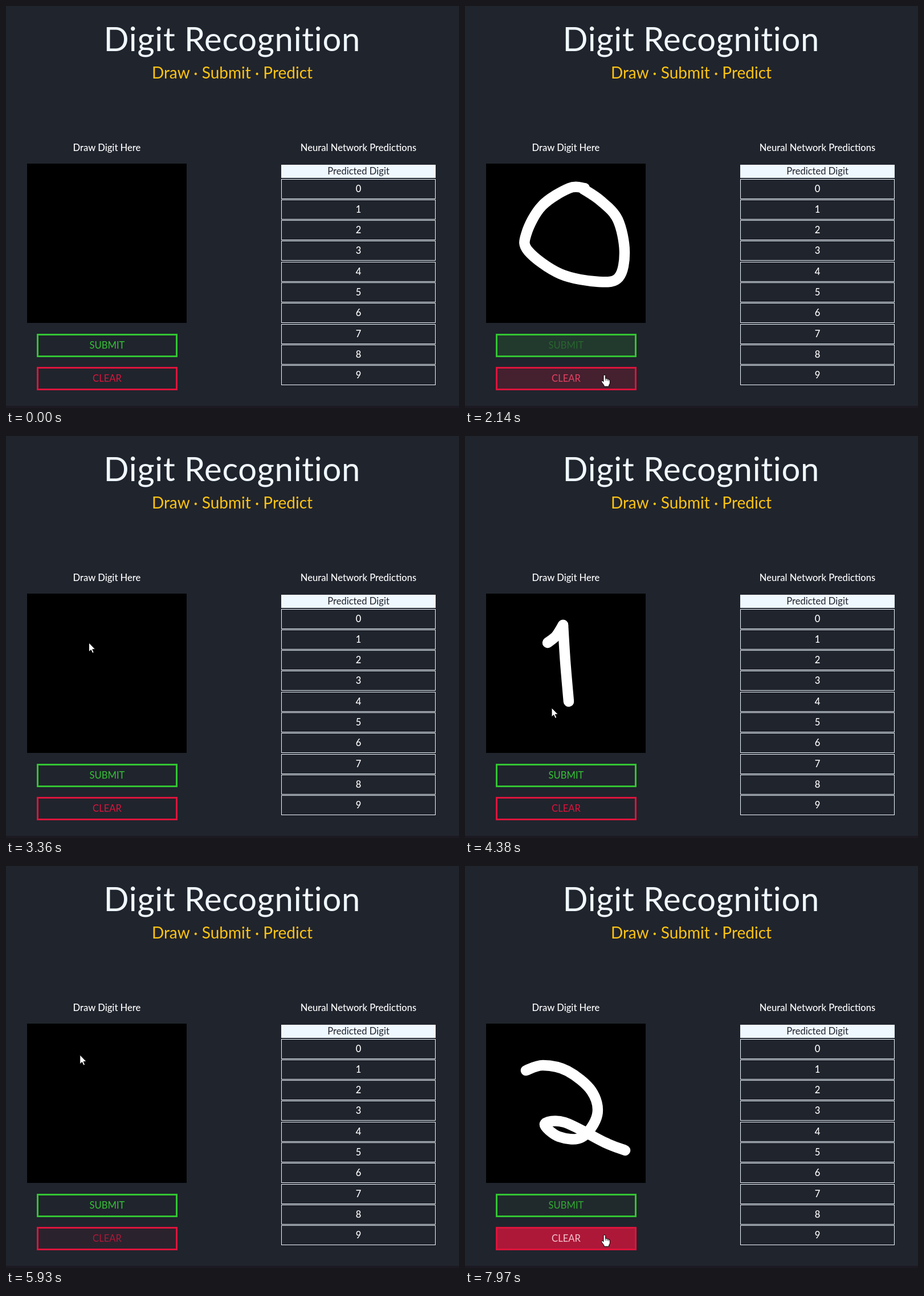
Write an HTML page that moves like this. It is 795 by 704 pixels and loops after 8 s.

```html
<!DOCTYPE html>
<html lang="en">
<head>
<meta charset="utf-8">
<title>Digit Recognition</title>
<style>
  html, body { margin: 0; width: 100%; height: 100%; overflow: hidden; background: #20242d; }
  svg { display: block; font: 16.6px Lato, sans-serif; text-anchor: middle; }
  .label { fill: #fff; font-weight: 500; }
  .ink { fill: none; stroke: #fff; stroke-width: 18.5; stroke-linecap: round; stroke-linejoin: round; }
  .pointer { fill: #fff; stroke: #000; stroke-width: 1; }
</style>
</head>
<body>
<svg width="795" height="704" viewBox="0 0 795 704">
  <rect width="795" height="704" fill="#20242d"/>
  <rect y="700" width="795" height="4" fill="#1d1a24"/>
  <text x="396.8" y="79" font-size="58" letter-spacing=".7" fill="#f0f8ff">Digit Recognition</text>
  <text x="397" y="127" font-size="28" fill="#fec412">Draw · Submit · Predict</text>
  <text class="label" x="177" y="254">Draw Digit Here</text>
  <text class="label" x="618.5" y="254">Neural Network Predictions</text>
  <rect x="37" y="276" width="280" height="279"/>
  <rect x="483" y="278" width="271" height="23" fill="#f0f8ff"/>
  <text x="618.5" y="295" fill="#20242d">Predicted Digit</text>
  <g id="rows"></g>
  <g id="ink"></g>
  <g id="buttons"></g>
  <g id="cursor">
    <circle id="halo" r="11" fill="#ff0" fill-opacity=".48"/>
    <path id="arrow" class="pointer" d="M0 0V16L3.7 12.6 6.3 18.3 8.8 17.2 6.3 11.6H11.3Z"/>
    <g id="hand">
      <path class="pointer" d="M-2 1.5Q-2 0 0 0 1.6 0 1.6 1.5V6.4Q3.4 5.6 4.4 7 6 6.4 7 8 9.4 7.6 9.4 10V14Q9.4 16 7.6 18V20.3H-1V18.4L-5.4 12.4Q-5.8 10 -4 10L-2 12Z"/>
      <path d="M1.6 6.4V10M4.4 7V10.4M7 8V11" fill="none" stroke="#000" stroke-width=".8"/>
    </g>
  </g>
</svg>
<script>
const LOOP = 8000, STEP = 50;
const FADE_IN = 180, FADE_OUT = 300, WIPE = 47, GROW = 190;
const BG = [32, 36, 45], WHITE = [255, 255, 255], PALE = [240, 248, 255], AMBER = [253, 199, 14];

const $ = id => document.getElementById(id);
const clamp = v => Math.min(1, Math.max(0, v));
const easeOut = p => 1 - (1 - p) ** 3;
const mix = (a, b, p) => `rgb(${a.map((v, i) => Math.round(v + (b[i] - v) * p))})`;
const show = (node, visible) => set(node, { visibility: visible ? 'inherit' : 'hidden' });

function set(node, attrs) {
  for (const name in attrs) node.setAttribute(name, attrs[name]);
}
function add(parent, tag, attrs = {}, text = '') {
  const node = document.createElementNS('http://www.w3.org/2000/svg', tag);
  set(node, attrs);
  node.textContent = text;
  return parent.appendChild(node);
}

// Smooth path through the points (Catmull-Rom).
function curve(points) {
  const at = i => points[Math.min(points.length - 1, Math.max(0, i))];
  const handle = (i, sign) => at(i).map((v, k) => v + sign * (at(i + 1)[k] - at(i - 1)[k]) / 6);
  return 'M' + points[0] + points.slice(1)
    .map((p, i) => `C${handle(i, 1)} ${handle(i + 1, -1)} ${p}`).join('');
}

// One round per digit: approach the pad, draw, submit, see the prediction, clear.
const rounds = [
  { approach: [100, 700, 664],
    strokes: [{ from: 790, to: 1450, points: [[210, 319], [183, 319], [135, 350], [108, 398], [111, 429],
      [167, 469], [235, 483], [270, 475], [280, 430], [268, 374], [238, 341], [207, 320]] }],
    submit: { enter: 1600, leave: 2035 }, predict: 2250, clear: { enter: 2105, leave: 2760 } },
  { approach: [3300, 146, 362],
    strokes: [
      { from: 3480, to: 3660, points: [[145, 362], [160, 350], [172, 331]] },
      { from: 3660, to: 4230, points: [[172, 331], [176, 395], [182, 465]] },
      { from: 4400, to: 4620, points: [[152, 476], [170, 474], [208, 473]] }],
    submit: { enter: 4700, leave: 5010 }, predict: 4880, clear: { enter: 5160, leave: 5710 } },
  { approach: [5920, 133, 327],
    strokes: [{ from: 6150, to: 6980, points: [[107, 358], [137, 349], [180, 359], [222, 394], [232, 436],
      [205, 475], [165, 474], [140, 452], [175, 449], [245, 484], [281, 498]] }],
    submit: { enter: 7330, leave: 7720 }, predict: LOOP, clear: { enter: 7835, leave: LOOP } }
];

const strokes = rounds.flatMap(round => round.strokes.map(stroke => {
  const node = add($('ink'), 'path', { class: 'ink', d: curve(stroke.points) });
  return { ...stroke, node, length: node.getTotalLength(), erased: round.clear.leave };
}));
const drawn = (s, t) => clamp((t - s.from) / (s.to - s.from)) * s.length;

const waypoints = rounds.flatMap(({ approach, strokes, submit, clear }) => [
  approach,
  ...strokes.flatMap(s => [[s.from, ...s.points[0]], [s.to, ...s.points.at(-1)]]),
  [submit.enter + 100, 252, 597], [submit.leave, 252, 597],
  [clear.enter + 20, 245, 646], [clear.leave, 245, 646]
]);

const buttons = [
  { name: 'submit', y: 574, color: [51, 196, 51] },
  { name: 'clear', y: 632, color: [220, 20, 60] }
];
for (const b of buttons) {
  const color = mix(b.color, b.color, 0), label = b.name.toUpperCase();
  const inside = { x: 57, y: b.y + 3, width: 241, height: 35, fill: color };
  const textAt = { x: 177.5, y: b.y + 26 };
  b.fill = add($('buttons'), 'rect', inside);
  b.text = add($('buttons'), 'text', textAt, label);
  b.lit = add($('buttons'), 'g');
  add(b.lit, 'rect', inside);
  add(b.lit, 'text', { ...textAt, fill: '#fff' }, label);
  add($('buttons'), 'rect', { x: 55.5, y: b.y + 1.5, width: 244, height: 38, fill: 'none', stroke: color, 'stroke-width': 3 });
}

const rows = Array.from({ length: 10 }, (_, digit) => ({
  box: add($('rows'), 'rect', { x: 483.5, width: 270 }),
  text: add($('rows'), 'text', { x: 618.5, 'font-weight': 500 }, digit)
}));

function drawRows(t) {
  let shift = 0;
  rows.forEach(({ box, text }, digit) => {
    const round = rounds[digit];
    const glow = round ? clamp((t - round.predict) / GROW) * (1 - clamp((t - round.clear.leave) / GROW)) : 0;
    const y = Math.floor(303 + 36.3 * digit) + Math.round(shift) + .5;
    const height = 34 + Math.round(26 * glow);
    const size = 16.6 + 10 * glow;
    set(box, { y, height, fill: mix(BG, AMBER, glow), stroke: mix(PALE, AMBER, glow) });
    set(text, { y: y + height / 2 + size * .35, 'font-size': size, fill: mix(WHITE, BG, glow) });
    shift += 26 * glow;
  });
}

// Hovering fades a button to white on colour; leaving wipes that away and the label recovers.
function drawButtons(t) {
  for (const b of buttons) {
    const hover = rounds.map(round => round[b.name]).findLast(h => h.enter <= t) || { enter: LOOP, leave: -LOOP };
    const gone = t - hover.leave;
    const lit = clamp((t - hover.enter) / FADE_IN);
    const rest = 1 - clamp(gone / FADE_OUT);
    set(b.fill, { 'fill-opacity': gone < 0 ? lit : .2 * rest });
    set(b.text, { fill: gone < 0 ? mix(b.color, WHITE, lit) : mix(b.color, BG, .9 * rest) });
    show(b.lit, gone >= 0 && gone < WIPE);
    b.lit.style.clipPath = `inset(0 0 0 ${clamp(gone / WIPE) * 100}%)`;
  }
}

function pointerAt(t) {
  const stroke = strokes.find(s => t >= s.from && t < s.to);
  if (stroke) return stroke.node.getPointAtLength(drawn(stroke, t));
  const next = waypoints.findIndex(w => w[0] > t);
  const b = waypoints.at(next), a = next > 0 ? waypoints[next - 1] : b;
  const p = easeOut(clamp((t - a[0]) / (b[0] - a[0] || 1)));
  return { x: a[1] + (b[1] - a[1]) * p, y: a[2] + (b[2] - a[2]) * p };
}

function drawPen(t) {
  for (const s of strokes) {
    show(s.node, t >= s.from && t < s.erased);
    // The ink trails the pointer by one step.
    set(s.node, { 'stroke-dasharray': `${drawn(s, t - STEP)} 9999` });
  }
  const { x, y } = pointerAt(t);
  const overButton = x > 54 && x < 301 && buttons.some(b => y >= b.y && y < b.y + 41);
  set($('cursor'), { transform: `translate(${x} ${y})` });
  show($('cursor'), t >= waypoints[0][0]);
  show($('halo'), strokes.some(s => t >= s.from && t < s.to));
  show($('hand'), overButton);
  show($('arrow'), !overButton);
}

// The picture advances in steps, restarted at each burst of activity.
const bursts = [0, 100, 920, 1740, 2640, 3460, 4330, 5180, 6050, 6900, 7720];
function step(t) {
  const start = bursts.findLast(b => b <= t);
  return start + Math.floor((t - start) / STEP) * STEP;
}

function frame() {
  const t = step(performance.now() % LOOP);
  drawRows(t);
  drawButtons(t);
  drawPen(t);
  requestAnimationFrame(frame);
}
frame();
</script>
</body>
</html>
```
